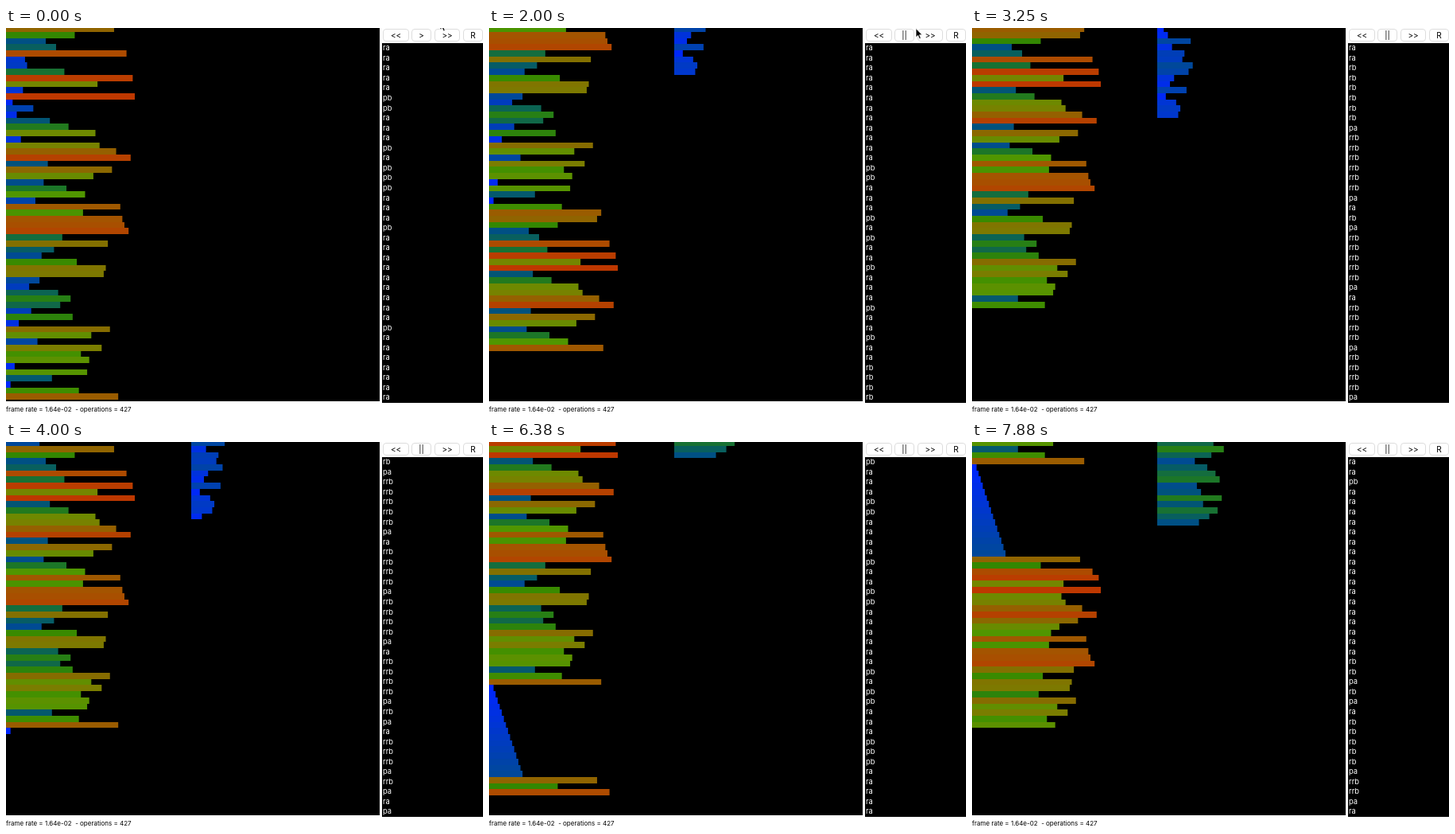
Animation of 600 by 485 pixels, one loop 8 s. Source, as an HTML page with a canvas:

```html
<!DOCTYPE html>
<html lang="en">
<head>
<meta charset="utf-8">
<title>Two-stack sort</title>
<style>
  html, body { margin: 0; width: 100%; height: 100%; overflow: hidden; background: #fff; }
  #stage { position: relative; width: 600px; height: 485px; overflow: hidden; font-family: Inter, sans-serif; color: #000; }
  #stage > * { position: absolute; }
  #bars { left: 0; top: 0; }
  #log { left: 473px; top: 19px; width: 127px; height: 452px; background: #000; }
  #ops { position: absolute; margin: 0; left: 1px; top: .3px; font: 9.3px/12.54px Inter, sans-serif; color: #fff; }
  .button {
    top: 1px; height: 16px; box-sizing: border-box; border: 1px solid #ddd; border-radius: 4px;
    font-size: 10px; line-height: 14px; text-align: center; background: #fff;
  }
  #status { left: 0; top: 474px; font-size: 8px; line-height: 10px; white-space: pre; }
  #cursor { left: 0; top: 0; width: 10px; height: 15px; overflow: visible; }
</style>
</head>
<body>
<div id="stage">
  <canvas id="bars" width="470" height="469"></canvas>
  <div id="log"><pre id="ops"></pre></div>
  <div class="button" style="left:474px;width:33px">&lt;&lt;</div>
  <div class="button" style="left:510px;width:25px" id="play">&gt;</div>
  <div class="button" style="left:539px;width:32px">&gt;&gt;</div>
  <div class="button" style="left:575px;width:25px">R</div>
  <div id="status">frame rate = 1.64e-02  - operations = 427</div>
  <svg id="cursor"><path d="M0 0V11.2L2.6 8.8 4.4 13 6.3 12.2 4.5 8.2H8Z" stroke="#fff" stroke-width=".8"/></svg>
</div>
<script>
const LOOP = 8000, TICK = 125, START_TICK = 6, OPS_PER_TICK = 3;
const ROW = 470 / 61, UNIT = 2.605, LEFT = -2.5, STACK_B = 235.5, LOG_LINES = 36;

const start = [
  51, 32, 18, 23, 57, 8, 9, 27, 60, 43, 7, 61, 2, 12, 4, 20, 29, 42, 6, 44, 52,
  59, 19, 50, 41, 17, 28, 37, 13, 54, 36, 55, 56, 58, 26, 48, 22, 16, 33, 47, 46,
  15, 10, 24, 30, 25, 11, 31, 5, 49, 40, 14, 45, 35, 39, 3, 38, 21, 1, 34, 53];

// Run-length program: count (default 1) followed by the operation
const program = `5ra 2pb 3ra pb ra 3pb 3ra pb 9ra pb 12ra 2pb 3ra pb ra pb 2ra pb 3ra pb 2ra pb 2ra
  6rb pa 6rrb pa ra rb pa 5rrb pa ra 4rrb pa 4rrb pa ra 4rrb pa rrb pa ra 3rrb pa rrb pa ra
  2pa ra 2rrb pa rrb pa ra pa 10ra 2pb ra pb 3ra 2pb 4ra pb 2ra 2pb 6ra pb ra 2pb 3ra 3pb
  7ra pb 17ra 2rb pa rb pa ra 5rb pa 2rrb pa ra`
  .match(/\d*[a-z]+/g)
  .flatMap(run => Array(parseInt(run) || 1).fill(run.replace(/\d/g, '')));

const actions = {
  ra: (a, b) => a.push(a.shift()),
  rb: (a, b) => b.push(b.shift()),
  rrb: (a, b) => b.unshift(b.pop()),
  pa: (a, b) => a.unshift(b.shift()),
  pb: (a, b) => b.unshift(a.shift())
};

// Position in the value range, then red, green, blue
const stops = [
  [0, 0, 38, 255], [.3, 0, 82, 125], [.37, 8, 96, 92], [.45, 28, 118, 40], [.52, 52, 136, 0],
  [.6, 80, 150, 0], [.7, 116, 134, 0], [.8, 134, 108, 0], [.9, 164, 84, 0], [1, 190, 56, 0]];

const $ = id => document.getElementById(id);
const ctx = $('bars').getContext('2d');
const mix = (from, to, f) => from + (to - from) * f;
const clamp = x => Math.min(1, Math.max(0, x));

function color(value) {
  const p = (value - 1) / 60;
  const i = Math.max(1, stops.findIndex(s => s[0] >= p));
  const low = stops[i - 1], high = stops[i];
  const f = (p - low[0]) / (high[0] - low[0]);
  return `rgb(${[1, 2, 3].map(c => Math.round(mix(low[c], high[c], f)))})`;
}

function drawStack(stack, x) {
  const edge = row => Math.round(row * ROW - 2.8);
  stack.forEach((value, row) => {
    ctx.fillStyle = color(value);
    ctx.fillRect(x + LEFT, edge(row), value * UNIT + 3.1 - LEFT, edge(row + 1) - edge(row));
  });
}

function opsDone(tick) {
  const lag = tick > 26 && tick < 46 ? 1 : 0;
  return Math.max(0, (tick - START_TICK) * OPS_PER_TICK - lag);
}

function render(tick) {
  const done = opsDone(tick), a = [...start], b = [];
  program.slice(0, done).forEach(op => actions[op](a, b));

  ctx.fillStyle = '#000';
  ctx.fillRect(0, 0, 470, 469);
  drawStack(a, 0);
  drawStack(b, STACK_B);

  const first = Math.max(0, done - 1);
  $('ops').textContent = program.slice(first, first + LOG_LINES).join('\n');
  $('play').textContent = tick < START_TICK ? '>' : '||';

  // The pointer comes in from above, clicks, and leaves the same way
  const reach = clamp(tick / 4) - clamp((tick - 14) / 4);
  const away = tick >= 18 ? -20 : -9;
  $('cursor').style.transform = `translate(${mix(546, 528, reach)}px, ${mix(away, 10, reach)}px)`;
}

const begin = performance.now();
let shown = -1;
function frame() {
  const tick = Math.floor((performance.now() - begin) % LOOP / TICK);
  if (tick !== shown) render(shown = tick);
  requestAnimationFrame(frame);
}
frame();
</script>
</body>
</html>
```
